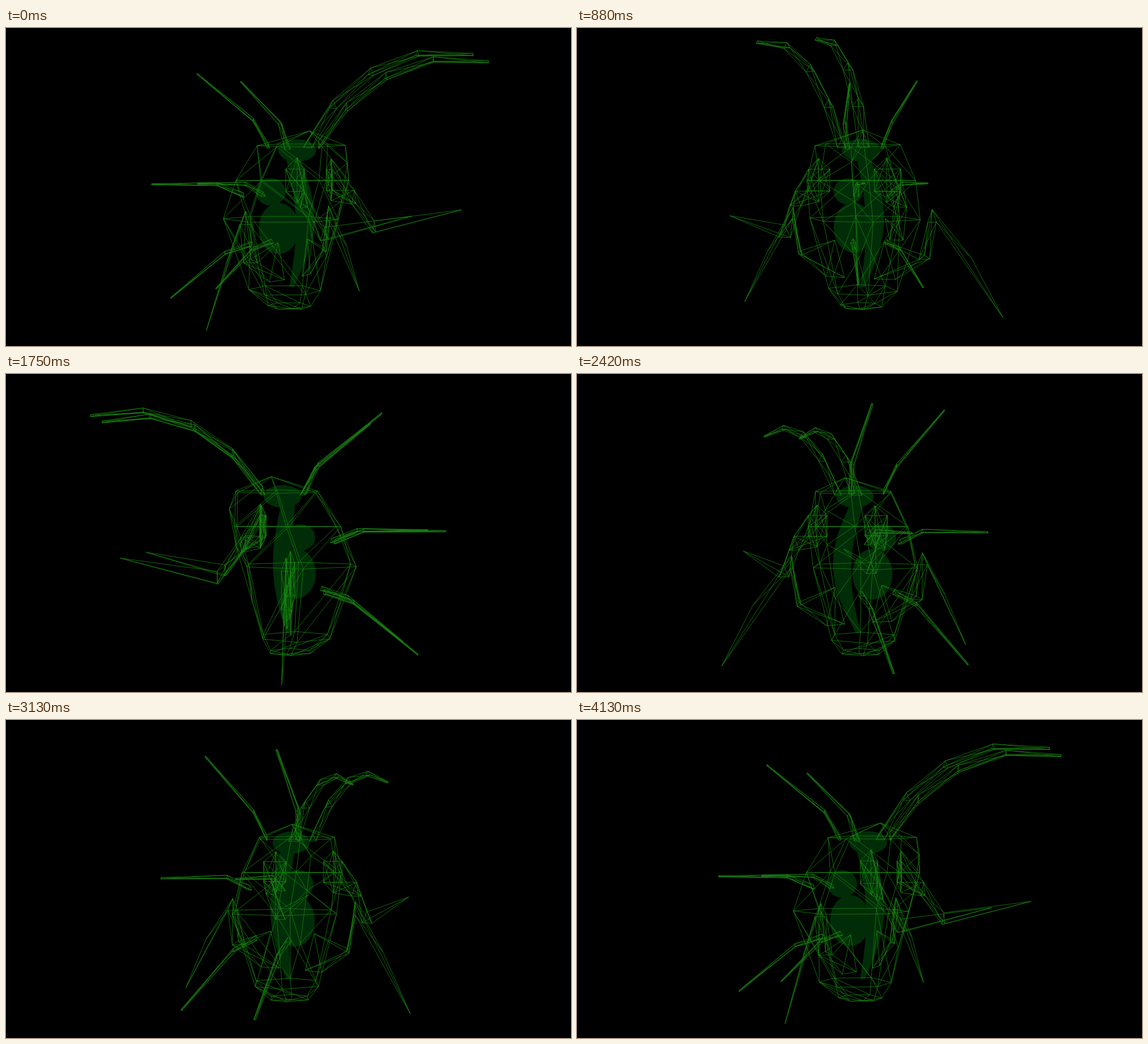
An HTML page with a canvas that plays this animation: 960x540 px, repeating every 4170 ms.

```html
<!DOCTYPE html>
<html lang="en">
<head>
<meta charset="utf-8">
<title>Rotating wireframe beetle</title>
<style>
  html, body { margin: 0; width: 100%; height: 100%; overflow: hidden; background: #000; }
  canvas { display: block; width: 960px; height: 540px; }
</style>
</head>
<body>
<canvas id="stage" width="960" height="540"></canvas>
<script>
const ctx = document.getElementById('stage').getContext('2d');
const LOOP = 4170, STEPS = 100, CAMERA = 1200, START = -59;
const { sin, cos, sqrt, floor, PI } = Math;
const RAD = PI / 180;
const points = [], edges = [];

// x is sideways, y is up, z is towards the beetle's front.
function polar(a, r, y) {
  return { x: r * sin(a * RAD), y, z: r * cos(a * RAD) };
}
function add(p) { return points.push(p) - 1; }
function link(a, ...others) { for (const b of others) edges.push([a, b]); }
function linkAll(list) {
  list.forEach((a, i) => link(a, ...list.slice(i + 1)));
}
function band(many, few) {
  many.forEach((v, i) => link(v, few[i % few.length], few[(i + 1) % few.length]));
}

// Loop of n vertices around a polar centre, spread by da, dr and dy.
function knot(n, side, [a, r, y], [da, dr, dy]) {
  const list = Array.from({ length: n }, (_, i) => {
    const t = PI / 2 + i * 2 * PI / n;
    return add(polar(side * (a + da * cos(t)), r + dr * cos(t), y + dy * sin(t)));
  });
  linkAll(list);
  return list;
}

// Triangular tube along a path of points, each with a thickness w.
function tube(path) {
  let last = null;
  for (const { x, y, z, w } of path) {
    const r = Math.hypot(x, z), lx = z / r * w, lz = -x / r * w;
    const ring = [
      add({ x, y: y + w, z }),
      add({ x: x + lx, y: y - w / 2, z: z + lz }),
      add({ x: x - lx, y: y - w / 2, z: z - lz })
    ];
    linkAll(ring);
    if (last) band(ring, last);
    last = ring;
  }
}

// The shell is an ovoid that leans forward at the top.
function onShell(a, y) {
  const t = (y + 50) / (y > -50 ? 150 : 185);
  const p = polar(a, 100 * sqrt(1 - t * t), y);
  p.z += 25 * sin((y + 20) / 65);
  return p;
}

function buildShell() {
  const heights = [50, -9, -75, -196, -222];
  const angles = [25, 90, 155, 205, 270, 335];
  const rings = heights.map(y => angles.map(a => add(onShell(a, y))));
  rings.forEach((ring, k) => ring.forEach((v, i) => {
    link(v, ring[(i + 1) % 6]);
    if (k) link(v, rings[k - 1][i], rings[k - 1][i < 3 ? i + 1 : i - 1]);
  }));
  const apex = add(polar(-23, 34, 75)), base = add(polar(0, 5, -226));
  rings[0].forEach(v => link(apex, v));
  rings[4].forEach(v => link(base, v));

  let last = apex;
  for (let k = 0; k < 3; k++) {
    const mid = add(onShell(-10, (heights[k] + heights[k + 1]) / 2));
    link(mid, last, rings[k][0], rings[k][5], rings[k + 1][0], rings[k + 1][5]);
    last = mid;
  }
}

function buildFeeler(side) {
  const path = [0, 0.25, 0.5, 0.75, 1].map(u => ({
    x: side * (19 + 21 * u),
    y: 50 + 132 * sin(u * 112 * RAD),
    z: 46 + 280 * u ** 1.25,
    w: 9 - 7 * u * u
  }));
  tube(path);
}

// Spines fan out from the back: k = 1 is the top pair, -1 the lowest.
function buildSpine(side, k) {
  const inner = (22 + 41 * k) * RAD, outer = 39 * k * RAD;
  const base = { x: side * 31, y: -35 + 83 * k, z: -(74 - 17 * k - 34 * k * k), w: 5 };
  const elbow = { x: side * 43, y: base.y + 50 * sin(inner), z: base.z - 50 * cos(inner), w: 3.5 };
  const tip = { x: side * 66, y: elbow.y + 130 * sin(outer), z: elbow.z - 130 * cos(outer), w: 1.3 };
  tube([base, elbow, tip]);
}

function buildArm(side) {
  const shoulder = knot(6, side, [50, 76, -8], [15, 15, 36]);
  const upper = knot(3, side, [48, 118, -42], [4, 8, 16]);
  const elbow = knot(3, side, [38, 147, -92], [4, 6, 13]);
  const claw = add(polar(side * 23, 285, -57));
  band(shoulder, upper);
  band(upper, elbow);
  link(claw, ...elbow);
}

// The two walking legs stand slightly unevenly.
function buildLeg(side) {
  const a = 89 + 3 * side, reach = 230 - 10 * side;
  const hip = knot(3, side, [a - 8, 45, -153], [8, 20, 42]);
  const thigh = knot(3, side, [a, 112, -136], [5, 8, 4]);
  const knee = knot(3, side, [a, 125, -70], [4, 6, 14]);
  const shin = add(polar(side * a, reach * 0.79, -133));
  const claw = add(polar(side * a, reach, -226));
  band(hip, thigh);
  band(thigh, knee);
  link(shin, knee[0], knee[2], claw);
  link(claw, knee[0], knee[2]);
}

buildShell();
for (const side of [1, -1]) {
  buildFeeler(side);
  for (const k of [1, 0, -1]) buildSpine(side, k);
  buildArm(side);
  buildLeg(side);
}

function project(p, turn) {
  const c = cos(turn), s = sin(turn);
  const scale = CAMERA / (CAMERA - (p.z * c - p.x * s));
  return {
    x: 482 - (p.x * c + p.z * s) * scale,
    y: 250 - p.y * (1 + 0.92 * (scale - 1)),
    scale
  };
}

function organ(center, rx, ry, turn) {
  const q = project(center, turn);
  ctx.beginPath();
  ctx.ellipse(q.x, q.y, rx * q.scale, ry * q.scale, 0, 0, 2 * PI);
  ctx.fill();
}

function drawCore(turn) {
  ctx.fillStyle = '#002d07';
  organ(polar(-20, 13, 42), 32, 19, turn);
  organ(polar(125, 35, -28), 25, 23, turn);
  organ(polar(125, 20, -90), 34, 43, turn);

  // Tapering strand from the head down to the tail.
  const left = [], right = [];
  for (let u = 0; u <= 1; u += 0.125) {
    const q = project(polar(-65, 4 + 28 * sin(PI * u), 35 - 225 * u), turn);
    const w = 11 - 7 * u + 8 * sin(PI * u);
    left.push([q.x - w, q.y]);
    right.unshift([q.x + w, q.y]);
  }
  ctx.beginPath();
  for (const [x, y] of [...left, ...right]) ctx.lineTo(x, y);
  ctx.fill();
}

function draw(turn) {
  ctx.fillStyle = '#000';
  ctx.fillRect(0, 0, 960, 540);
  drawCore(turn);
  ctx.strokeStyle = 'rgba(26, 134, 18, 0.75)';
  ctx.lineWidth = 1;
  const flat = points.map(p => project(p, turn));
  for (const [a, b] of edges) {
    ctx.beginPath();
    ctx.moveTo(flat[a].x, flat[a].y);
    ctx.lineTo(flat[b].x, flat[b].y);
    ctx.stroke();
  }
}

function tick() {
  const step = floor((performance.now() % LOOP) / LOOP * STEPS);
  draw((step * 360 / STEPS + START) * RAD);
  requestAnimationFrame(tick);
}
tick();
</script>
</body>
</html>
```
